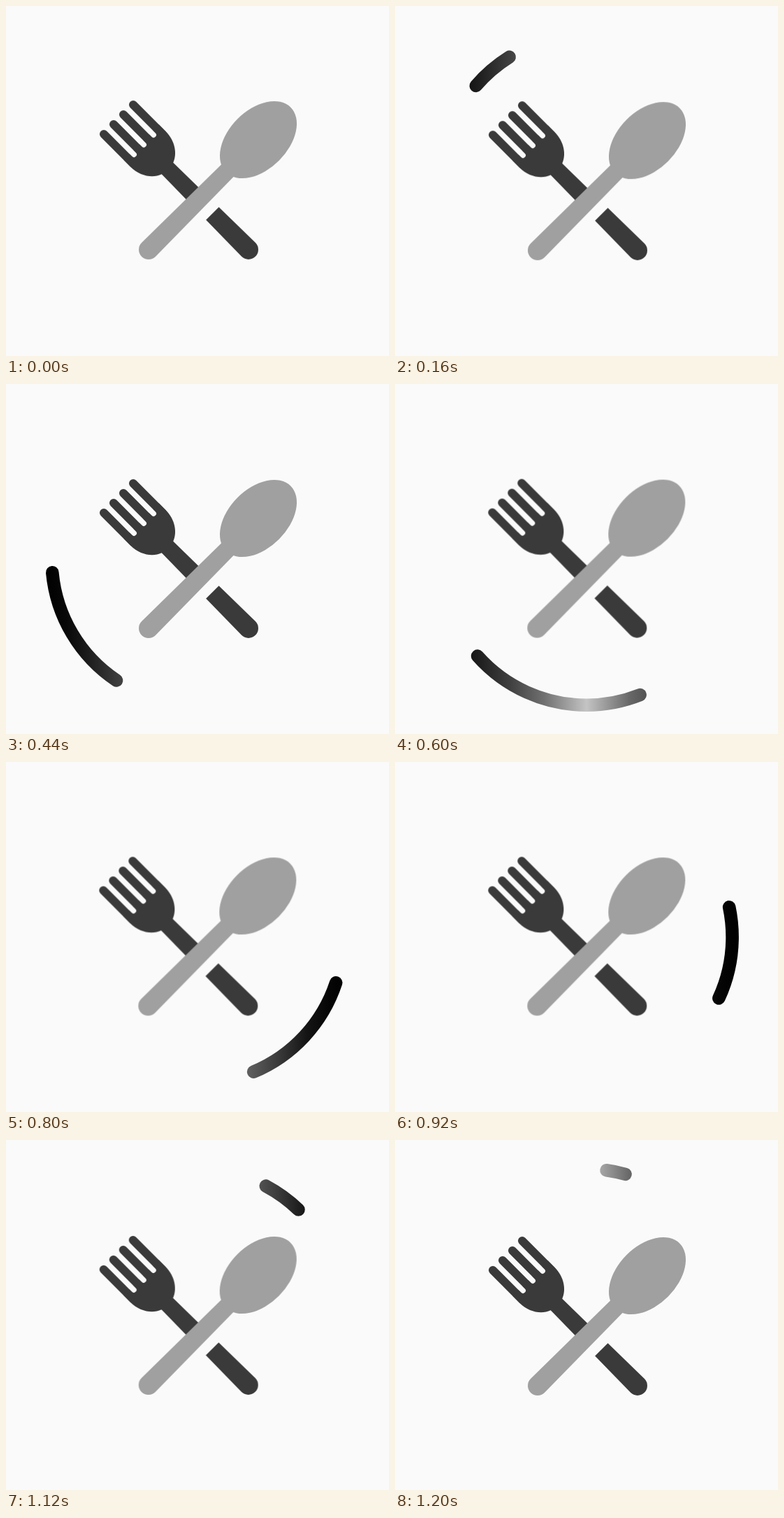
Recreate the animation shown at these times as an HTML page. Size 548 px wide and 500 px high, loop 1.24 s.

```html
<!DOCTYPE html>
<html lang="en">
<head>
<meta charset="utf-8">
<title>Fork and spoon loader</title>
<style>
  html, body { margin: 0; width: 100%; height: 100%; overflow: hidden; background: #fafafa; }
  svg { display: block; width: 548px; height: 500px; }

  .arc {
    fill: none;
    stroke: url(#shine);
    stroke-width: 18.6;
    stroke-linecap: round;
    animation: sweep 1240ms linear infinite;
  }
  .icon { animation: bob 1240ms linear infinite; }
  .fork { fill: #3a3a3a; }
  .spoon { fill: #a0a0a0; }
  .tines { stroke: #3a3a3a; stroke-width: 12; stroke-linecap: round; }

  /* Lengths are degrees, counted anticlockwise from the top */
  @keyframes sweep {
    0%, 1.6% { stroke-dasharray: 0 400; stroke-dashoffset: 0; stroke-opacity: 0; }
    1.61% { stroke-dasharray: 0.5 400; stroke-dashoffset: 0; stroke-opacity: 1; }
    48.39% { stroke-dasharray: 70 400; stroke-dashoffset: -131.3; }
    100% { stroke-dasharray: 3.5 400; stroke-dashoffset: -358.4; stroke-opacity: 1; }
  }
  @keyframes bob {
    0% { transform: translate(0, 0); }
    22.58% { transform: translate(0, 2px); }
    35.48% { transform: translate(0, 1px); }
    48.39% { transform: translate(-0.7px, 0.6px); }
    64.52%, 80.65% { transform: translate(-0.7px, 0.4px); }
    96.77%, 100% { transform: translate(0, 3px); }
  }
</style>
</head>
<body>
<svg viewBox="0 0 548 500">
  <defs>
    <linearGradient id="shine" gradientUnits="userSpaceOnUse" x1="56" y1="0" x2="492" y2="0">
      <stop offset="0" stop-color="#000"/>
      <stop offset="0.07" stop-color="#080808"/>
      <stop offset="0.14" stop-color="#1c1c1c"/>
      <stop offset="0.25" stop-color="#404040"/>
      <stop offset="0.36" stop-color="#707070"/>
      <stop offset="0.5" stop-color="#c4c4c4"/>
      <stop offset="0.64" stop-color="#686868"/>
      <stop offset="0.75" stop-color="#404040"/>
      <stop offset="0.86" stop-color="#141414"/>
      <stop offset="0.93" stop-color="#060606"/>
      <stop offset="1" stop-color="#000"/>
    </linearGradient>
  </defs>

  <path class="arc" pathLength="360"
        d="M274 41.3 A208.7 208.7 0 0 0 274 458.7 A208.7 208.7 0 0 0 274 41.3"/>

  <g class="icon">
    <g class="fork" transform="translate(161 162) rotate(-45)">
      <path class="tines" d="M-29.7 0V60 M-9.9 0V60 M9.9 0V60 M29.7 0V60"/>
      <!-- Bowl with three rounded slots, then the neck -->
      <path d="M-35.7 46 H-23.7 V51 A3.9 3.9 0 0 0 -15.9 51 V46 H-3.9 V51 A3.9 3.9 0 0 0 3.9 51
               V46 H15.9 V51 A3.9 3.9 0 0 0 23.7 51 V46 H35.7 V60
               C35.7 79 25 94 11.7 99 L12.4 160 H-12.4 L-11.7 99 C-25 94 -35.7 79 -35.7 60 Z"/>
      <path d="M-13 190 H13 L14 263 A14 14 0 0 1 -14 263 Z"/>
    </g>
    <g class="spoon" transform="translate(361 191) rotate(45)">
      <ellipse rx="42" ry="65.5"/>
      <path d="M-12.3 50 H12.3 L14 222 A14 14 0 0 1 -14 222 Z"/>
    </g>
  </g>
</svg>
</body>
</html>
```
